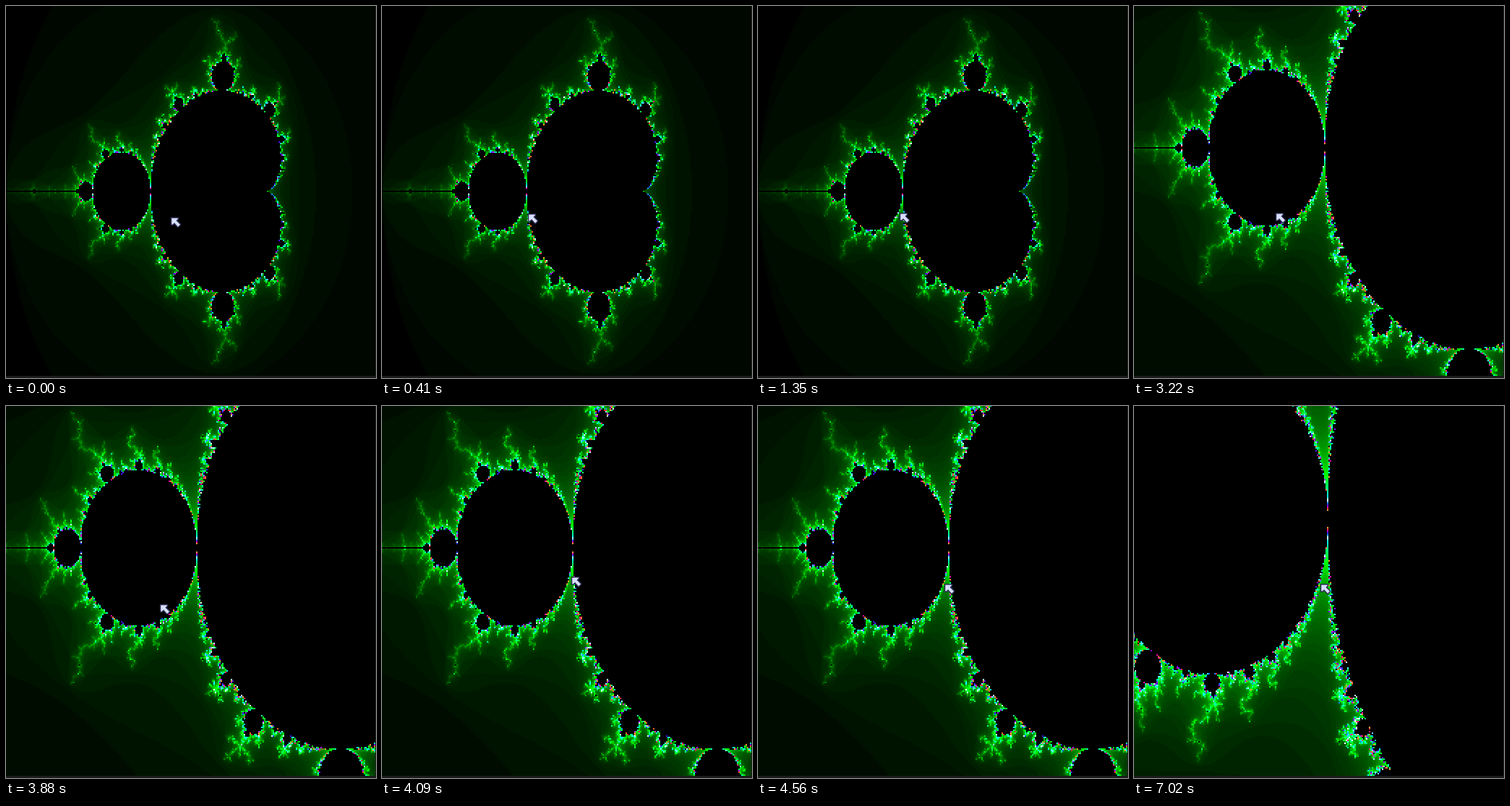
An HTML page with a canvas that plays this animation: 512x514 px, repeating every 8 s.

```html
<!DOCTYPE html>
<html lang="en">
<head>
<meta charset="utf-8">
<title>Mandelbrot zoom</title>
<style>
  html, body { margin: 0; width: 100%; height: 100%; overflow: hidden; background: #1c1c1c; }
  canvas { display: block; }
</style>
</head>
<body>
<canvas id="stage" width="512" height="514"></canvas>
<script>
const LOOP = 8000, CELLS = 256, MID = CELLS / 2, MAX_ITER = 256;
const STEP_X = 3.2 / CELLS, STEP_Y = 2.4 / CELLS;
const ctx = document.getElementById('stage').getContext('2d');

const clamp = t => Math.min(1, Math.max(0, t));
const ramp = (n, from, to) => clamp((n - from) / (to - from));

// Green first, then cyan, a white flash, blue, purple, red and orange.
function colour(n) {
  if (n === MAX_ITER) return [0, 0, 0];
  const flash = clamp(1 - Math.abs(n - 104) / 16);
  const red = flash + ramp(n, 125, 170);
  const green = ramp(n, 0, 42) - ramp(n, 106, 140) + 0.6 * ramp(n, 175, 225);
  const blue = ramp(n, 42, 85) - 0.8 * ramp(n, 155, 190);
  return [red, green, blue].map(v => Math.round(255 * clamp(v)));
}

const PALETTE = Array.from({ length: MAX_ITER + 1 }, (_, n) => colour(n));

function escapeTime(cx, cy) {
  let x = cx, y = cy, n = 0;
  while (n < MAX_ITER && x * x + y * y <= 4) {
    [x, y] = [x * x - y * y + cx, 2 * x * y + cy];
    n++;
  }
  return n;
}

// The centre is given in cells of the unzoomed view, so the real axis stays exact.
function renderView(centreX, centreY, zoom) {
  const canvas = document.createElement('canvas');
  canvas.width = canvas.height = CELLS;
  const c = canvas.getContext('2d');
  const image = c.createImageData(CELLS, CELLS);
  for (let j = 0; j < CELLS; j++) {
    const im = (centreY - MID + (j - MID) / zoom) * STEP_Y;
    for (let i = 0; i < CELLS; i++) {
      const re = -2 + (centreX + (i - MID) / zoom) * STEP_X;
      image.data.set([...PALETTE[escapeTime(re, im)], 255], 4 * (j * CELLS + i));
    }
  }
  c.putImageData(image, 0, 0);
  return canvas;
}

// Each move jumps in equal steps, the first at start and the last at end.
const HOME = { x: 227, y: 291 };
const MOVES = [
  { start: 70, end: 140, steps: 2, x: 209, y: 283 },
  { start: 340, end: 410, steps: 2, x: 201, y: 286 },
  { start: 890, end: 890, steps: 1, x: 195, y: 289 },
  { start: 1090, end: 1350, steps: 4, x: 195, y: 285 },
  { start: 3880, end: 4090, steps: 4, x: 261, y: 235 },
  { start: 4220, end: 4220, steps: 1, x: 263, y: 235 },
  { start: 4420, end: 4560, steps: 3, x: 257, y: 245 }
];

function pointerAt(time) {
  let { x, y } = HOME;
  for (const m of MOVES) {
    if (time < m.start) break;
    const passed = time >= m.end ? m.steps
      : 1 + Math.floor((time - m.start) / (m.end - m.start) * (m.steps - 1));
    x += Math.round((m.x - x) * passed / m.steps);
    y += Math.round((m.y - y) * passed / m.steps);
  }
  return { x, y };
}

// Every zoom doubles the scale around the cell under the pointer.
function buildViews(zoomTimes) {
  let x = MID, y = MID, zoom = 1;
  const views = [{ time: 0, picture: renderView(x, y, zoom) }];
  for (const time of zoomTimes) {
    const tip = pointerAt(time);
    x += ((tip.x + 1) / 2 - MID) / zoom;
    y += ((tip.y + 1) / 2 - MID) / zoom;
    zoom *= 2;
    views.push({ time, picture: renderView(x, y, zoom) });
  }
  return views;
}

const VIEWS = buildViews([3220, 7020]);
const ARROW = new Path2D('M1.5 1.5H11.5V3.5L9.5 5.5L14.5 10.5V11.5L11.5 14.5H10.5L6 9.5L4 11.5H1.5Z');

function drawPointer({ x, y }) {
  ctx.save();
  ctx.translate(x, y);
  ctx.fillStyle = '#d8e0ff';
  ctx.strokeStyle = '#2c2c50';
  ctx.lineWidth = 1.5;
  ctx.fill(ARROW);
  ctx.stroke(ARROW);
  ctx.restore();
}

function draw(time) {
  ctx.fillStyle = '#1c1c1c';
  ctx.fillRect(0, 0, 512, 514);
  ctx.imageSmoothingEnabled = false;
  ctx.drawImage(VIEWS.filter(v => v.time <= time).pop().picture, -1, -1, 512, 512);
  drawPointer(pointerAt(time));
}

const start = performance.now();
function tick() {
  draw((performance.now() - start) % LOOP);
  requestAnimationFrame(tick);
}
tick();
</script>
</body>
</html>
```
